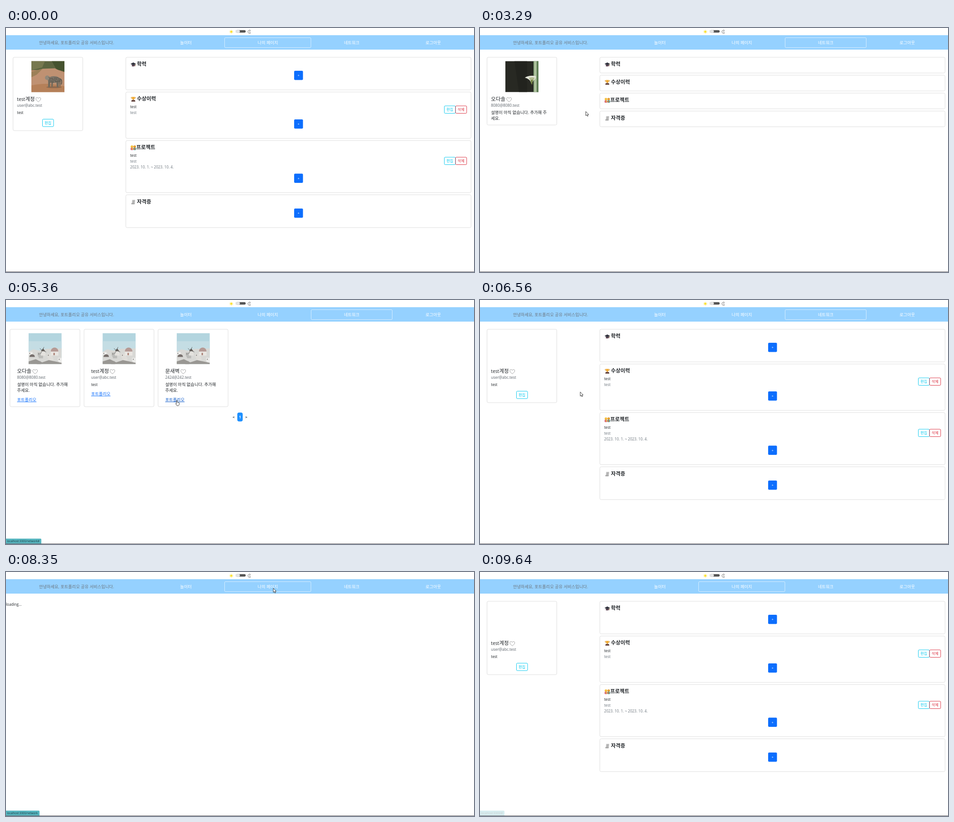
Animation, 1033 px wide and 542 px high, one loop 9740 ms. Source, as an HTML page:

```html
<!DOCTYPE html>
<html lang="ko">
<head>
<meta charset="utf-8">
<title>포트폴리오</title>
<style>
html, body { margin: 0; width: 100%; height: 100%; overflow: hidden; background: #fff; }
svg { display: block; width: 1033px; height: 542px; }
text { font-family: "Open Sans", "Noto Sans CJK KR", "Noto Sans CJK", "Noto Sans", sans-serif; white-space: pre; }
</style>
</head>
<body>
<svg id="stage" viewBox="0 0 1033 542"></svg>
<script>
const LOOP = 9740, FRAMES = 98, STEP = LOOP / FRAMES;
const KO = 9.28, EN = 8.1;
const INK = '#212529', MUTED = '#6c757d', BLUE = '#0d6efd', CYAN = '#0dcaf0', RED = '#dc3545';

// From this frame on: page, active tab, photo
const scenes = [
  [0, 'mine', 1, 'leopard'], [17, 'network', 2, ''], [23, 'network', 2, 'flower'],
  [28, 'loading', 2, ''], [30, 'user', 2, ''], [31, 'user', 2, 'flower'],
  [46, 'network', 2, ''], [49, 'network', 2, 'mill'], [63, 'loading', 2, ''],
  [65, 'mine', 2, ''], [67, 'mine', 2, 'mill'], [84, 'loading', 1, ''], [90, 'mine', 1, '']
];

// Status bubble: first frame, last frame, label, width, fade-in, fade-out frames
const NET = 'localhost:3000/network';
const bubbles = [
  [7, 18, NET, 74, 3, 2], [24, 31, NET + '#', 78, 2, 2], [41, 47, NET, 74, 2, 2],
  [53, 65, NET + '#', 78, 1, 2], [78, 85, NET, 74, 2, 1],
  [86, 92, 'picsum.photos의 응답을 기다리는 중...', 343, 1, 1],
  [93, 97, 'localhost:3000/#', 54, 1, 3]
];

// Pointer path: frame, x, y
const path = [
  [3, 752, 4], [4, 766, 22], [5, 773, 36], [7, 774, 37], [10, 776, 36], [14, 773, 37], [17, 770, 37],
  [21, 178, 209], [24, 48, 219], [26, 45, 221], [30, 47, 221], [36, 420, 150], [41, 728, 35],
  [44, 728, 34], [45, 624, 141], [49, 500, 208], [53, 381, 220], [54, 377, 223],
  [57, 377, 223], [61, 209, 208], [65, 209, 208], [72, 430, 140], [78, 712, 33], [80, 703, 35],
  [83, 596, 34], [84, 590, 36], [88, 543, 202], [90, 560, 150], [92, 600, 8]
];

const rect = (x, y, w, h, fill, r = 0, more = '') =>
  `<rect x="${x}" y="${y}" width="${w}" height="${h}" rx="${r}" fill="${fill}" ${more}/>`;
const frame = (x, y, w, h, color, r = 3) => rect(x, y, w, h, 'none', r, `stroke="${color}"`);
const shape = (d, fill, more = '') => `<path d="${d}" fill="${fill}" ${more}/>`;
const dot = (x, y, r, fill) => `<circle cx="${x}" cy="${y}" r="${r}" fill="${fill}"/>`;
const oval = (x, y, rx, ry, fill) => `<ellipse cx="${x}" cy="${y}" rx="${rx}" ry="${ry}" fill="${fill}"/>`;
const at = (x, y, body) => `<g transform="translate(${x} ${y})">${body}</g>`;
const text = (x, y, s, size = KO, fill = INK, more = '') =>
  `<text x="${x}" y="${y}" font-size="${size}" fill="${fill}" ${more}>${s}</text>`;
const MID = 'text-anchor="middle"';
const card = (x, y, w, h) => frame(x, y, w, h, '#dedede');

function button(x, y, s, color) {
  return frame(x, y, 24.5, 16.5, color, 2) + text(x + 12.2, y + 11.3, s, 8.1, color, MID);
}
function plus(y) {
  return rect(636, y, 19.5, 20.5, BLUE, 2.2) + text(645.7, y + 13.2, '+', 8, '#fff', MID);
}
function heart(x, y) {
  return at(x, y, shape('M0 5C-3 2.6-5.4.8-5.4-1.8C-5.4-5-1.3-5.6 0-2.6C1.3-5.6 5.4-5 5.4-1.8C5.4.8 3 2.6 0 5Z',
    '#fff', 'stroke="#777" stroke-width=".7"'));
}

const photos = {
  leopard() {
    let s = rect(0, 0, 73, 69, '#b88a68') + rect(0, 0, 73, 20, '#5d6540')
      + shape('M0 0H30L24 14L0 20Z', '#77784f') + shape('M45 0H73V24L55 18Z', '#46532f')
      + shape('M25 17L52 16L73 27V69H0V24Z', '#bf9172') + shape('M0 24L25 17L12 30L0 36Z', '#9c8058')
      + shape('M0 54Q35 46 73 56V69H0Z', '#b58059') + oval(50, 58, 17, 2, '#8e694e');
    s += oval(50, 41, 14, 7.5, '#7c7467') + oval(35, 37, 5, 5, '#91887a')
      + shape('M37 43H42L41 58H37ZM44 45H48L47 57H44ZM55 44H61L60 58H56ZM61 42H65L64 56H62Z', '#716a5d')
      + shape('M63 39Q69 42 66 52', 'none', 'stroke="#5d574c" stroke-width="2"');
    for (let i = 0; i < 26; i++)
      s += dot(39 + i * 7.3 % 24, 36 + i * 4.7 % 11, .8, '#3f3b35');
    return s;
  },
  flower() {
    return rect(0, 0, 73, 69, '#282923') + shape('M20 0H48V69H30Z', '#22231e')
      + rect(62, 0, 11, 69, '#84a078') + rect(64, 0, 4, 69, '#b1c3a0') + rect(70, 0, 3, 69, '#58784e')
      + shape('M43 37Q50 31 67 33Q69 39 62 43L58 50L54 43Q49 38 43 37Z', '#e3e5d8')
      + shape('M52 37Q59 35 65 37L58 49Z', '#b3bb90') + shape('M56 42L61 41L59 53L56 48Z', '#778648');
  },
  mill() {
    let s = rect(0, 0, 73, 69, '#b3d5df') + rect(0, 18, 73, 24, '#c4dde4')
      + shape('M0 42L10 36L25 39L40 35L73 34V69H0Z', '#d8d8d5');
    for (let i = 0; i < 18; i++) {
      const x = i * 23 % 70, y = 42 + i * 7 % 23;
      s += rect(x, y, 9, 7, ['#ededeb', '#bcbcb9', '#e0deda'][i % 3])
        + rect(x + 2, y + 2, 1.5, 2.5, '#75716e');
    }
    s += rect(49, 39, 17, 11, '#e9e6e2') + shape('M49 41A8.5 9 0 0 1 66 41Z', '#b59a95')
      + shape('M2 53A6 6 0 0 1 14 53Z', '#776f6c') + rect(55, 44, 3, 5, '#a77c70')
      + shape('M28 39L36 39L38 50H27Z', '#e4e2de') + shape('M27 40L32 34L37 40Z', '#69635e')
      + shape('M31 39L25 34M31 39L34 31M31 39L39 42M31 39L26 46', 'none', 'stroke="#4c4c4b" stroke-width=".8"')
      + shape('M0 63L16 58L30 65L45 60L73 66V69H0Z', '#999793');
    return s;
  }
};
const photo = (x, kind) => kind
  ? `<svg x="${x}" y="73.5" width="73.2" height="69" viewBox="0 0 73.2 69">${photos[kind]()}</svg>` : '';

const icons = [
  shape('M-6-1L0-4.3L6-1L0 2.5Z', '#33343f') + shape('M-3.3 1L0 2.8L3.5.8V3.5Q0 5.5-3.3 3.6Z', '#4b2c3d')
    + shape('M4.5-1V4', 'none', 'stroke="#8d6a3b" stroke-width=".8"'),
  shape('M-3-5H3Q3 1 0 1Q-3 1-3-5Z', '#f2ad36') + shape('M-3-4H-5Q-5-1-2-1M3-4H5Q5-1 2-1', 'none', 'stroke="#d99328"')
    + rect(-.8, 0, 1.6, 3, '#c98527') + shape('M-3.5 2H3.5L4.5 5.5H-4.5Z', '#61413a'),
  dot(-3, -2.3, 2.8, '#f3bf3b') + dot(3, -2.3, 2.8, '#e49b33') + rect(-6, 0, 5.8, 5.5, '#d7687b', 1.5)
    + rect(.2, 0, 5.8, 5.5, '#58a494', 1.5) + dot(-2, 2.5, 1.7, '#f1b43b') + dot(2.4, 3, 1.7, '#da6d48'),
  shape('M-2.5-4.5H4.2L3.2 4.6H-3.5Z', '#c6c6c6') + rect(-4.5, 3, 7.5, 2.3, '#9c9c9c', 1)
    + shape('M-1-2.5H2.7M-1.2-.6H2.4M-1.4 1.2H2.2', 'none', 'stroke="#8b8b8b" stroke-width=".6"')
];
const titles = ['학력', '수상이력', '프로젝트', '자격증'];
function section(i, y, h) {
  return card(264.5, y, 762, h) + at(281, y + 15.8, icons[i])
    + text(i === 2 ? 287.5 : 289, y + 19.2, titles[i], 11.4, INK, 'font-weight="700"');
}

const people = {
  a: { name: '오다솔', mail: '8080@8080.test' },
  b: { name: '', mail: 'user@abc.test' },
  c: { name: '문새벽', mail: '2424@242.test' }
};
const EMPTY = ['설명이 아직 없습니다. 추가해 주세요.', 12];
function profile(x, p, cut) {
  const { name, mail } = p;
  let s = name ? text(x, 161.6, name, 11.5) + heart(x + 39.8, 159)
    : text(x, 161.6, 'test', 10.3, INK, 'font-weight="500"') + text(x + 18.3, 161.6, '계정', 11.4) + heart(x + 47, 159);
  s += text(x, 175, mail, 8.4, '#5c636a', 'font-weight="500"');
  if (!name) return s + text(x, 190.7, 'test', EN);
  const full = EMPTY[0];
  return s + text(x, 190.8, full.slice(0, cut)) + text(x, 203.6, full.slice(cut));
}

const pages = {
  mine(pic) {
    let s = card(15.5, 65, 154, 163) + photo(56, pic) + profile(24.3, people.b)
      + button(80.5, 202.5, '편집', CYAN);
    [[65, 72.5, 95], [142.2, 103, 203], [250, 115.8, 323.5], [370.5, 73, 401]]
      .forEach(([y, h, p], i) => s += section(i, y, h) + plus(p));
    for (const [y, b] of [[178.3, 173], [286, 287]])
      s += text(274, y, 'test', EN) + text(274, y + 12.9, 'test', EN, MUTED)
        + button(967.5, b, '편집', CYAN) + button(992.3, b, '삭제', RED);
    return s + text(274, 311.7, '2023. 10. 1. ~ 2023. 10. 4.', 8.2, MUTED);
  },
  user(pic) {
    return card(15.5, 65, 154, 150.5) + photo(56, pic) + profile(24.3, people.a, 18)
      + titles.map((_, i) => section(i, 65 + i * 39.8, 35)).join('');
  },
  network(pic, hot) {
    const cards = Object.values(people).map((p, i) => {
      const x = 8.7 + i * 163.5, y = p.name ? 225 : 212.2, color = hot === i ? '#0a58ca' : BLUE;
      return card(x, 65, 154.5, 172) + photo(x + 41, pic) + profile(x + 15.7, p, 17)
        + text(x + 15.7, y, '포트폴리오', KO, color)
        + rect(x + 15.7, y + 1, 42.8, .8, color);
    }).join('');
    const bold = MID + ' font-weight="700"';
    return cards + rect(510.5, 250, 12, 19.8, '#1e90ff', 4) + text(516.5, 263, '1', 8, '#fff', bold)
      + text(502.3, 263, '&lt;', 7.5, INK, bold) + text(530.3, 263, '&gt;', 7.5, INK, bold);
  },
  loading: () => text(0, 74.6, 'loading...', EN)
};

const tabs = [['놀이터', 397], ['나의 페이지', 578], ['네트워크', 763], ['로그아웃', 943]];
const tabBox = { 1: [482.5, 190.5], 2: [673.5, 179] };
function header(active, hover) {
  let s = rect(0, 16, 1033, 32, '#95d1ff') + text(73, 35.5, '안녕하세요, 포트폴리오 공유 서비스입니다.', KO, MUTED);
  for (const [label, x] of tabs) s += text(x, 35.5, label, KO, '#fff', MID);
  for (const i of new Set([active, hover]))
    if (tabBox[i]) s += frame(tabBox[i][0], 21.5, tabBox[i][1], 22, 'rgba(255,255,255,.62)', 2);
  for (let i = 0; i < 8; i++)
    s += shape('M0-2.8V-4.3', 'none', `stroke="#f4d51f" stroke-width=".8" transform="translate(497.3 8.3) rotate(${i * 45})"`);
  return s + dot(497.3, 8.3, 2.4, '#fbe12b')
    + rect(507, 4.8, 22, 5.5, '#555', 2.7) + rect(507, 4.8, 9.3, 5.5, '#e4e4e4', 2.7)
    + shape('M539.6 5.1A3.7 3.7 0 1 0 539.8 11.4A3.7 3.7 0 0 1 539.6 5.1Z', 'none', 'stroke="#555" stroke-width=".8"');
}

function bubble(n) {
  const b = bubbles.find(b => n >= b[0] && n <= b[1]);
  if (!b) return '';
  const [from, to, label, w, rise, fall] = b;
  const alpha = Math.min(1, (n - from + 1) / rise, (to - n + .6) / (fall - .4));
  return `<g opacity="${alpha.toFixed(2)}">` + shape(`M0 530H${w - 2}Q${w} 530 ${w} 532V541H0Z`, '#58b6c0')
    + text(2.3, 538.2, label, 6.2, '#173b41') + '</g>';
}

function pointerAt(n) {
  const k = path.findIndex(p => p[0] >= n);
  if (k < 0 || n < path[0][0]) return null;
  if (k === 0) return path[0].slice(1);
  const [a, b] = [path[k - 1], path[k]];
  let u = (n - a[0]) / (b[0] - a[0]);
  u = u * u * (3 - 2 * u);
  return [1, 2].map(i => a[i] + (b[i] - a[i]) * u);
}
const OUTLINE = 'stroke="#111" stroke-width=".8" stroke-linejoin="round"';
const ARROW = shape('M0 0V9.2L2.1 7.4L3.6 10.6L5.1 9.9L3.7 6.8H6.5Z', '#fff', OUTLINE);
const HAND = shape('M-.9 6V1Q-.9 0 0 0Q.9 0 .9 1V4Q2 3.3 2.7 4.4Q3.8 3.8 4.2 5Q5.4 4.7 5.4 6V8.5Q5 11 3.8 11.7H.3L-2.4 7.5Q-2.6 6-.9 7.3Z',
  '#fff', OUTLINE);

function draw(n) {
  const [, page, active, pic] = scenes.filter(s => s[0] <= n).pop();
  const p = pointerAt(n);
  let hover = 0, hot = -1;
  if (p) {
    const [x, y] = p;
    if (y < 44) hover = x > 673 && x < 853 ? 2 : x > 482 && x < 673 && y > 21 ? 1 : 0;
    if (page === 'network')
      hot = [0, 1, 2].findIndex(i => {
        const left = 24 + i * 163.5, top = i === 1 ? 203 : 216;
        return x >= left && x <= left + 43 && y >= top && y <= top + 12;
      });
  }
  stage.innerHTML = header(active, hover) + pages[page](pic, hot) + bubble(n)
    + rect(0, 541, 1033, 1, '#625f66')
    + (p ? at(p[0], p[1], hot < 0 ? ARROW : HAND) : '');
}

const stage = document.getElementById('stage');
let shown = -1;
function tick(now) {
  const n = Math.min(FRAMES - 1, Math.floor((now % LOOP + 10) / STEP));
  if (n !== shown) draw(shown = n);
  requestAnimationFrame(tick);
}
draw(0);
requestAnimationFrame(tick);
</script>
</body>
</html>
```
